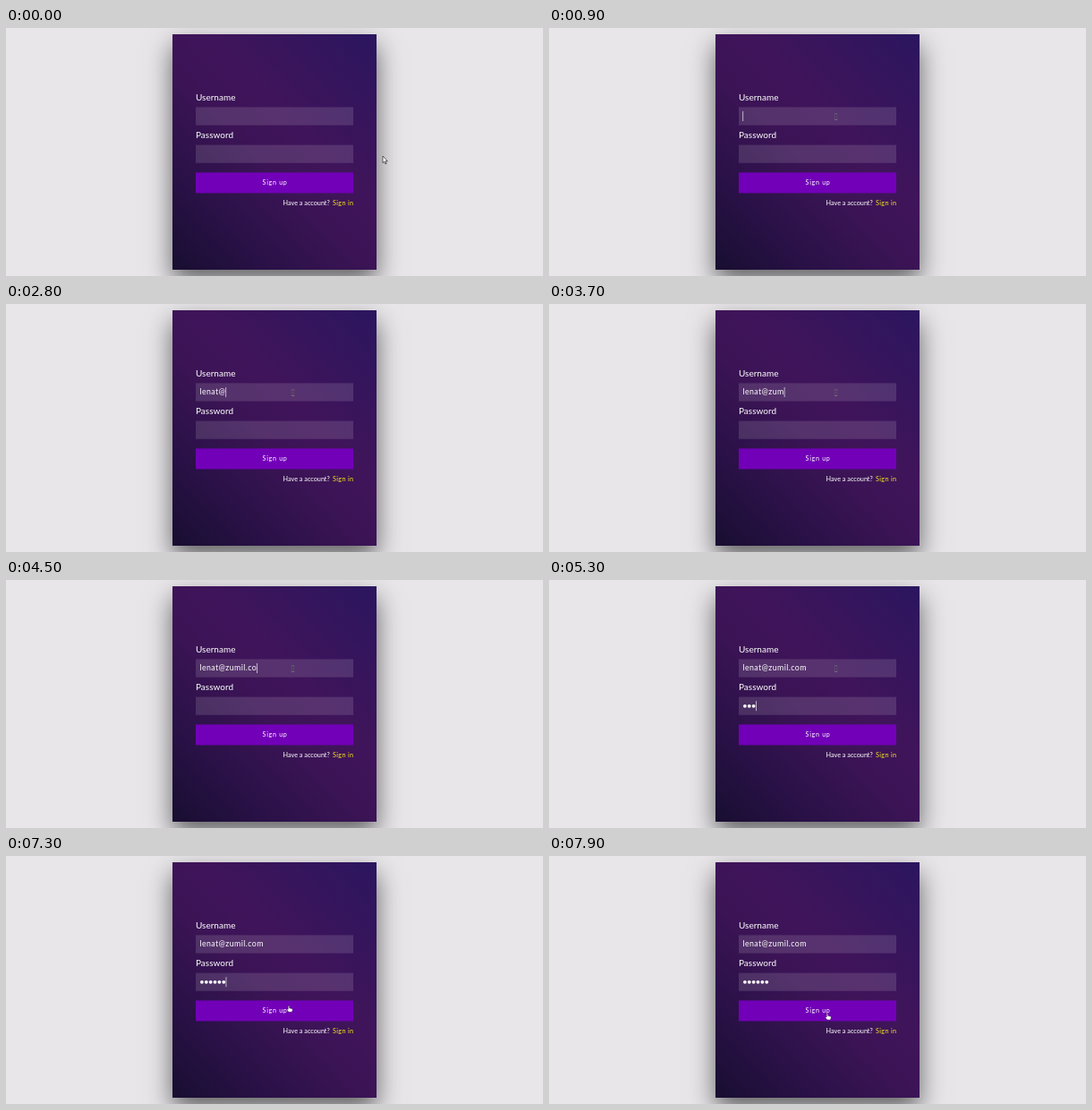
Animation of 600 by 277 pixels, one loop 8 s. Source, as an HTML page:

```html
<!DOCTYPE html>
<html lang="en">
<head>
<meta charset="utf-8">
<title>Sign up form</title>
<style>
html, body { margin: 0; width: 100%; height: 100%; overflow: hidden; background: #e8e6e9; }
#stage { position: relative; width: 600px; height: 277px; overflow: hidden; }
#card {
  position: absolute; left: 186px; top: 7px; width: 228px; height: 263px;
  background: linear-gradient(45deg, #180e31, #2a1147 23%, #3c1456 46%, #40145a 60%, #2b165f);
  box-shadow: 0 13px 27px rgba(0, 0, 0, .58);
}
svg { position: absolute; left: 0; top: 0; }
text { font-family: Nunito, Lato, "Open Sans", sans-serif; fill: #fff; white-space: pre; }
.label { font-size: 10px; }
.note { font-size: 7.25px; }
.field { fill: #fff; fill-opacity: .125; }
#user { font-size: 8.8px; letter-spacing: .42px; }
#go { font-size: 7.1px; letter-spacing: .72px; }
#link { fill: #f3e81c; letter-spacing: .3px; }
</style>
</head>
<body>
<div id="stage">
  <div id="card"></div>
  <svg width="600" height="277" viewBox="0 0 600 277">
    <text class="label" x="212" y="80.7">Username</text>
    <rect class="field" x="212" y="88.4" width="176" height="20.2"/>
    <text id="user" x="216.4" y="101.4"></text>
    <text class="label" x="212" y="122.8">Password</text>
    <rect class="field" x="212" y="130.6" width="176" height="20.2"/>
    <g id="dots" fill="#fff"></g>
    <rect x="212" y="161.4" width="176" height="23" fill="#7200b8"/>
    <text id="go" x="286.6" y="175.3">Sign up</text>
    <text class="note" x="309.6" y="197.7">Have a account?</text>
    <text class="note" id="link" x="388.3" y="197.7" text-anchor="end">Sign in</text>
    <rect id="caret" width=".7" height="11" fill="#fff" fill-opacity=".9"/>
    <g id="pointer">
      <path id="arrow" d="M0 0V7.6L1.7 6.1L2.9 8.8L4.1 8.3L2.9 5.7H5.2Z" fill="#fff" stroke="#222" stroke-width=".7"/>
      <g id="beam" fill="none" stroke-linecap="round">
        <path d="M-1.1 -2.9Q0 -2.9 0 -2V2Q0 2.9 -1.1 2.9M1.1 -2.9Q0 -2.9 0 -2M0 2Q0 2.9 1.1 2.9" stroke="#b9a9c0" stroke-width="1.3"/>
        <path d="M-1.1 -2.9Q0 -2.9 0 -2V2Q0 2.9 -1.1 2.9M1.1 -2.9Q0 -2.9 0 -2M0 2Q0 2.9 1.1 2.9" stroke="#17111c" stroke-width=".7"/>
      </g>
      <path id="hand" d="M-.8 .4Q0 -.5 .7 .4V2.6L3.4 3.1Q4.4 3.4 4.2 4.6L3.5 7H-.2L-2.2 4.5Q-2.4 3.3 -.8 4Z" fill="#fff" stroke="#2a1638" stroke-width=".5"/>
    </g>
  </svg>
</div>
<script>
const LOOP = 8000, STEP = 100;
const EMAIL = "lenat@zumil.com";
const START_X = 216.4, DOT_PITCH = 4.87;

// Times at which each character lands
const userKeys = [1300, 1400, 1500, 1600, 1800, 2500, 3300, 3500, 3700, 3800, 4000, 4200, 4400, 4500, 4700];
const passKeys = [5100, 5200, 5300, 5500, 5900, 6100];
// Caret: [from, to, field]
const caretSpans = [
  [900, 2200, "user"], [2500, 3000, "user"], [3300, 4700, "user"],
  [4900, 6700, "pass"], [7100, 7600, "pass"]
];
// Pointer moves: start and end time, then three curve points
const moves = [
  { from: 0, to: 800, pts: [[421, 143], [378, 106], [320.5, 99]] },
  { from: 6600, to: 7500, pts: [[320.5, 99], [333, 142], [311, 176]] }
];

const $ = id => document.getElementById(id);
const user = $("user"), caret = $("caret"), pointer = $("pointer");
const show = (el, on) => el.setAttribute("visibility", on ? "visible" : "hidden");
const typed = (keys, t) => keys.filter(k => k <= t).length;

const dots = passKeys.map((_, i) => {
  const dot = document.createElementNS("http://www.w3.org/2000/svg", "circle");
  dot.setAttribute("cx", 218.9 + i * DOT_PITCH);
  dot.setAttribute("cy", 140.8);
  dot.setAttribute("r", 1.9);
  return $("dots").appendChild(dot);
});

function pointerAt(t) {
  const { from, to, pts: [a, b, c] } = moves[t < moves[1].from ? 0 : 1];
  const p = Math.min(1, Math.max(0, (t - from) / (to - from)));
  const e = p * p * (3 - 2 * p), r = 1 - e;
  return [0, 1].map(i => r * r * a[i] + 2 * r * e * b[i] + e * e * c[i]);
}

function shapeAt([x, y]) {
  if (x < 212 || x > 388) return "arrow";
  if (y > 161 && y < 185) return "hand";
  return (y > 88 && y < 109) || (y > 130 && y < 151) ? "beam" : "arrow";
}

function draw(now) {
  const t = Math.floor(now % LOOP / STEP) * STEP;
  const chars = EMAIL.slice(0, typed(userKeys, t));
  if (user.textContent !== chars) user.textContent = chars;

  const count = typed(passKeys, t);
  dots.forEach((dot, i) => show(dot, i < count));

  const span = caretSpans.find(([from, to]) => t >= from && t < to);
  show(caret, span);
  if (span) {
    const inUser = span[2] === "user";
    const width = inUser ? (chars ? user.getComputedTextLength() : 0) : count * DOT_PITCH;
    caret.setAttribute("x", START_X + width);
    caret.setAttribute("y", inUser ? 93 : 135.2);
  }

  const at = pointerAt(t), shape = shapeAt(at);
  pointer.setAttribute("transform", `translate(${at})`);
  for (const id of ["arrow", "beam", "hand"]) show($(id), id === shape);
}

function tick() {
  draw(performance.now());
  requestAnimationFrame(tick);
}
tick();
</script>
</body>
</html>
```
